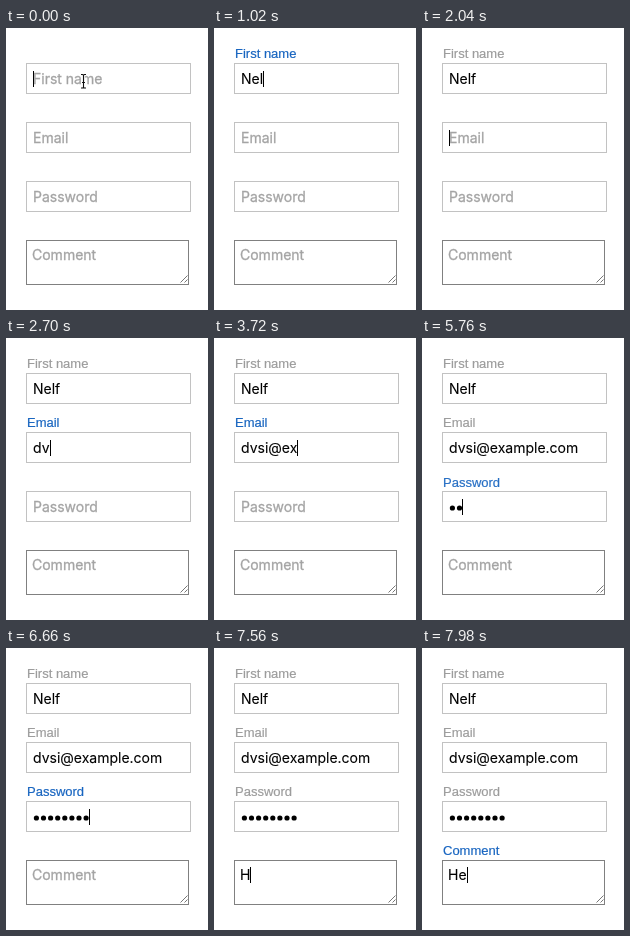
An HTML page for the animation above (8000 ms loop, 202 px wide and 282 px high).

```html
<!DOCTYPE html>
<html lang="en">
<head>
<meta charset="utf-8">
<title>Floating labels</title>
<style>
  html, body { margin: 0; width: 100%; height: 100%; overflow: hidden; background: #fff; }
  svg { display: block; width: 202px; height: 282px; }
  .box { fill: none; stroke: #c2c2c2; }
  .area { stroke: #808080; }
  .hint, .value { font: 14px Inter, Roboto, sans-serif; white-space: pre; }
  .hint { fill: #a4a4a4; stroke: #a4a4a4; stroke-width: .3px; }
  .value { fill: #000; stroke: #000; stroke-width: .1px; }
  .label { font: 13px "Liberation Sans", Arial, sans-serif; stroke-width: .2px; }
</style>
</head>
<body>
<svg id="stage" viewBox="0 0 202 282" xmlns="http://www.w3.org/2000/svg"></svg>
<script>
const LOOP = 8000, STEP = 60, FADE = 240;
const GRAY = [156, 156, 156], BLUE = [24, 101, 192];
const svg = document.getElementById('stage');

// keys: the time at which each character is typed
const fields = [
  { name: 'First name', top: 35, x: 27, text: 'Nelf', focus: 0, blur: 1740,
    keys: [660, 900, 1020, 1260] },
  { name: 'Email', top: 94, x: 27, text: 'dvsi@example.com', focus: 1740, blur: 5100,
    keys: [2340, 2580, 2880, 3120, 3120, 3480, 3720, 3840, 3960,
           4140, 4260, 4380, 4500, 4560, 4680, 4800] },
  { name: 'Password', top: 153, x: 27, secret: true, focus: 5100, blur: 6840,
    keys: [5580, 5760, 5940, 6120, 6360, 6480, 6600, 6660] },
  { name: 'Comment', top: 212, x: 26, text: 'He', area: true, focus: 6840, blur: LOOP,
    keys: [7560, 7980] }
];
const blinks = [[360, 660], [7320, 7560]];
const DOT = 7.1;

function add(tag, attrs, text = '') {
  const el = document.createElementNS(svg.namespaceURI, tag);
  set(el, attrs);
  el.textContent = text;
  return svg.appendChild(el);
}

function set(el, attrs) {
  for (const key in attrs) el.setAttribute(key, attrs[key]);
}

const show = (el, on) => set(el, { visibility: on ? 'visible' : 'hidden' });
const progress = (t, start) => {
  const p = Math.min(1, Math.max(0, (t - start) / FADE));
  return 1 - (1 - p) ** 2;
};
const mix = (a, b, p) => `rgb(${a.map((v, i) => Math.round(v + (b[i] - v) * p))})`;

for (const f of fields) {
  const { top, x, area } = f;
  f.base = top + (area ? 20 : 21);
  add('rect', {
    class: area ? 'box area' : 'box', x: 20.5, y: top + .5,
    width: area ? 162 : 164, height: area ? 44 : 30
  });
  f.hint = add('text', { class: 'hint', x, y: f.base }, f.name);
  f.value = add('text', { class: 'value', x, y: f.base });
  f.label = add('text', { class: 'label', x: 21 }, f.name);
  f.dots = f.secret
    ? f.keys.map((_, i) => add('circle', { cx: x + 3.4 + i * DOT, cy: top + 17, r: 2.6 }))
    : [];
}

// resize handle
add('path', { d: 'M174.5 254.5l7-7M178.5 254.5l3-3', stroke: '#777', fill: 'none' });

const caret = add('rect', { width: 1, height: 16, fill: '#000' });

const pointer = add('g', { fill: 'none' });
const beam = 'M75 46.5h1.5q1 0 1 1q0-1 1-1H80M77.5 47v12M75 60h1.5q1 0 1-1q0 1 1 1H80M76 54.5h3';
for (const [stroke, width] of [['#fff', 2.6], ['#111', 1.1]]) {
  pointer.appendChild(add('path', { d: beam, stroke, 'stroke-width': width }));
}

function draw(time) {
  const t = Math.floor(time / STEP) * STEP;
  for (const f of fields) {
    const count = f.keys.filter(k => k <= t).length;
    const rise = progress(t, f.keys[0]);
    const color = mix(BLUE, GRAY, progress(t, f.blur));

    show(f.hint, !count);
    f.value.textContent = f.secret ? '' : f.text.slice(0, count);
    f.dots.forEach((dot, i) => show(dot, i < count));
    set(f.label, { y: f.top - 5 + 15 * (1 - rise), opacity: rise, fill: color, stroke: color });

    if (t >= f.focus && t < f.blur) {
      const width = f.secret ? count * DOT - (count ? .8 : 0)
        : count ? f.value.getComputedTextLength() : 0;
      set(caret, { x: Math.round(f.x + width), y: f.base - 13 });
    }
  }
  show(caret, !blinks.some(([off, on]) => t >= off && t < on));
  show(pointer, t < 60);
}

const start = performance.now();
function tick() {
  draw((performance.now() - start) % LOOP);
  requestAnimationFrame(tick);
}
tick();
</script>
</body>
</html>
```
